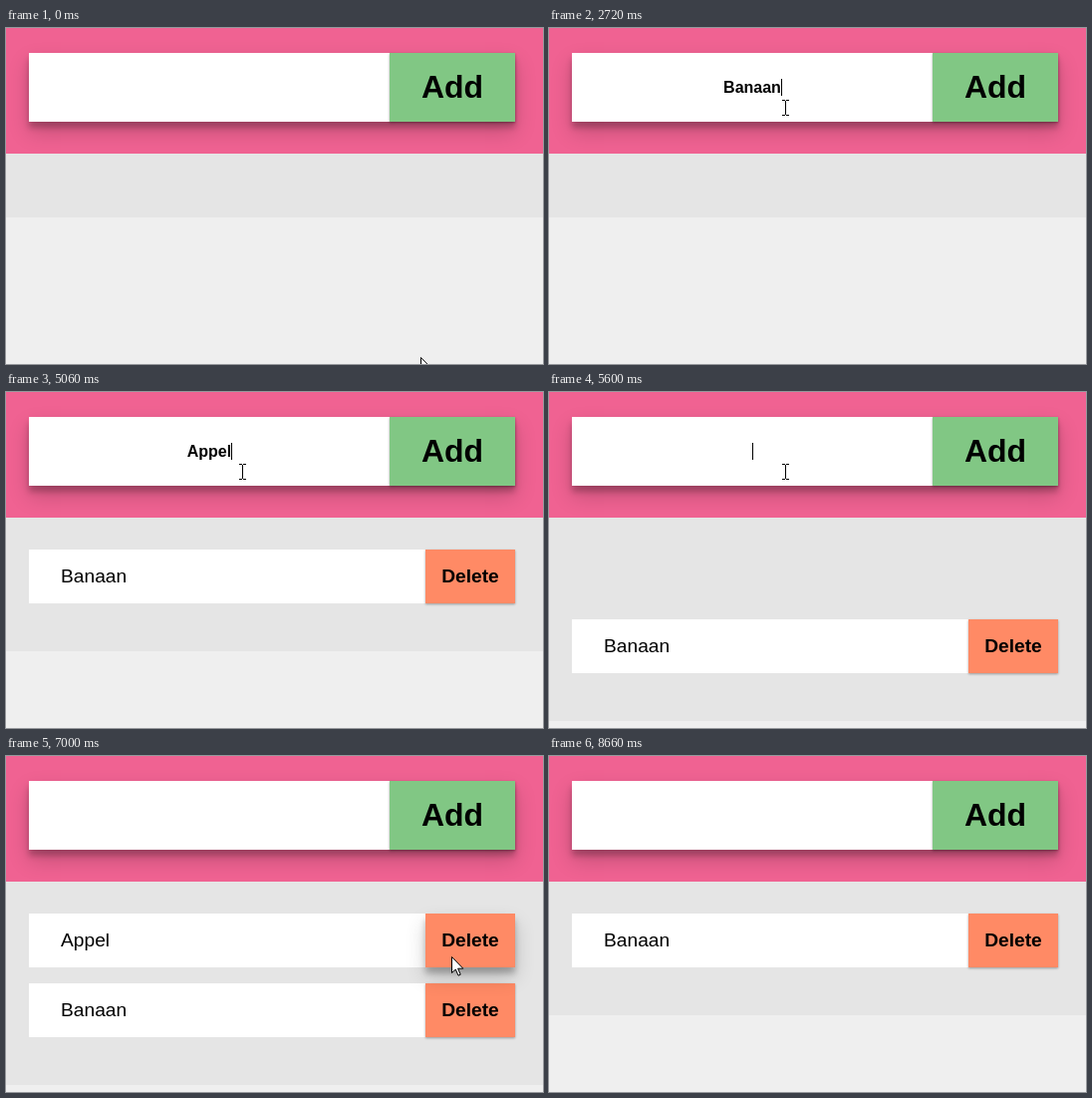
An HTML page for the animation above (8.89 s loop, 539 px wide and 337 px high).

```html
<!DOCTYPE html>
<html lang="nl">
<head>
<meta charset="utf-8">
<title>List</title>
<style>
  html, body { margin: 0; width: 100%; height: 100%; overflow: hidden; }
  body { background: #efefef; font-family: "Liberation Sans", Arial, sans-serif; color: #000; }
  div, #cursors svg { position: absolute; }
  #stage { width: 539px; height: 337px; overflow: hidden; }
  #header { width: 539px; height: 126px; background: #f06292; }
  #list { top: 126px; width: 539px; background: #e5e5e5; }
  #bar {
    left: 23px; top: 25px; width: 488px; height: 69px; background: #fff;
    box-shadow: 0 10px 20px rgba(0,0,0,.19), 0 6px 6px rgba(0,0,0,.23);
  }
  #field { width: 362px; top: 26px; font: bold 16px/17px "Liberation Sans", Arial, sans-serif; text-align: center; }
  #typed { display: inline-block; position: relative; height: 17px; vertical-align: top; }
  #caret { left: 100%; top: 0; width: 1px; height: 17px; background: #000; }
  .button { right: 0; top: 0; text-align: center; font-weight: bold; }
  #add {
    width: 126px; height: 69px; background: #81c784; font-size: 32px; line-height: 69px;
    box-shadow: 0 1px 3px rgba(0,0,0,.12), 0 1px 2px rgba(0,0,0,.24);
  }
  .item { left: 23px; width: 488px; height: 54px; background: #fff; font-size: 19.2px; line-height: 54px; }
  .item span { position: absolute; left: 32px; }
  .item .button { width: 90px; height: 54px; background: #ff8a65; }
  #cursors { z-index: 9; }
</style>
</head>
<body>
<div id="stage">
  <div id="header"></div>
  <div id="list"></div>
  <div id="bar">
    <div id="field"><span id="typed"><span id="word"></span><div id="caret"></div></span></div>
    <div id="add" class="button">Add</div>
  </div>
  <div class="item" id="banaan"><span>Banaan</span><div class="button">Delete</div></div>
  <div class="item" id="appel" style="z-index:1"><span>Appel</span><div class="button">Delete</div></div>
  <div id="cursors">
    <svg id="arrow" width="14" height="21">
      <path d="M.5 .5V16.5L4.3 13L7 19.2L9.2 18.2L6.6 12.2H11.8Z" fill="#fff" stroke="#000"/>
    </svg>
    <svg id="beam" width="7" height="16" style="left:-3px;top:-8px" shape-rendering="crispEdges">
      <path d="M0 .5H3M4 .5H7M3.5 1V15M0 15.5H3M4 15.5H7" fill="none" stroke="#000"/>
    </svg>
  </div>
</div>
<script>
const LOOP = 8890;
const ADD_BANAAN = 3250, ADD_APPEL = 5600, DELETE_APPEL = 7380;
const FADE = 400, REMOVED = DELETE_APPEL + FADE;
const FIRST_ROW = 158, ROW = 70;

const typing = [
  [0, ""], [1740, "B"], [2030, "Ba"], [2340, "Ban"], [2420, "Bana"], [2560, "Banaa"], [2720, "Banaan"],
  [ADD_BANAAN, ""], [4460, "A"], [4700, "Ap"], [4840, "App"], [4980, "Appe"], [5060, "Appel"], [ADD_APPEL, ""]
];
const caretOn = [[970, 1510], [1740, 3710], [4170, 6060], [6480, 7000], [7460, 7850], [8280, 8660]];
// Each move: start, end, from, to
const moves = [
  [30, 740, [416, 330], [237, 80]],
  [6100, 6720, [237, 80], [447, 201]],
  [7800, 8120, [447, 201], [455, 345]]
];

const $ = id => document.getElementById(id);
const clamp = x => Math.min(1, Math.max(0, x));
const lerp = (a, b, p) => a + (b - a) * p;
const smooth = p => p * p * (3 - 2 * p);

// The CSS "ease" curve: cubic-bezier(.25, .1, .25, 1)
function ease(x) {
  x = clamp(x);
  const bezier = (a, b, s) => 3 * a * s * (1 - s) ** 2 + 3 * b * s * s * (1 - s) + s ** 3;
  let low = 0, high = 1;
  for (let i = 0; i < 20; i++) {
    const mid = (low + high) / 2;
    if (bezier(.25, .25, mid) < x) low = mid; else high = mid;
  }
  return bezier(.1, 1, low);
}

function cursorAt(t) {
  let position = moves[0][2];
  for (const [start, end, from, to] of moves) {
    if (t < start) break;
    const p = smooth(clamp((t - start) / (end - start)));
    position = from.map((v, i) => Math.round(lerp(v, to[i], p)));
  }
  return position;
}

function shadow(p) {
  const layer = (y, blur, alpha) => `0 ${y}px ${blur}px rgba(0,0,0,${alpha})`;
  return layer(lerp(1, 10, p), lerp(3, 20, p), lerp(.12, .19, p)) + "," +
         layer(lerp(1, 6, p), lerp(2, 6, p), lerp(.24, .23, p));
}

function drawItem(id, visible, top, presence, hover) {
  const item = $(id);
  item.style.display = visible ? "block" : "none";
  item.style.top = top + "px";
  item.style.opacity = presence;
  item.style.transform = presence < 1 ? `translateY(${-20 * (1 - presence)}px)` : "none";
  item.lastElementChild.style.boxShadow = shadow(hover);
}

function render(t) {
  $("word").textContent = typing.filter(([start]) => t >= start).pop()[1];
  $("caret").hidden = !caretOn.some(([on, off]) => t >= on && t < off);

  const [x, y] = cursorAt(t);
  const overField = x >= 23 && x < 385 && y >= 25 && y < 94;
  $("cursors").style.transform = `translate(${x}px,${y}px)`;
  $("arrow").style.display = overField ? "none" : "block";
  $("beam").style.display = overField ? "block" : "none";

  const hasAppel = t >= ADD_APPEL && t < REMOVED;
  const count = (t >= ADD_BANAAN) + hasAppel;
  $("list").style.height = 64 + ROW * count + "px";

  const appelPresence = ease((t - ADD_APPEL) / FADE) * (1 - ease((t - DELETE_APPEL) / FADE));
  const hoverIn = ease((t - 6580) / 300);
  const hoverOut = t < REMOVED ? 0 : 1 - ease((t - REMOVED) / 100) * (1 - ease((t - 7880) / 240));
  drawItem("appel", hasAppel, FIRST_ROW, appelPresence, hoverIn);
  drawItem("banaan", t >= ADD_BANAAN, FIRST_ROW + (hasAppel ? ROW : 0),
    ease((t - ADD_BANAAN) / FADE), t < REMOVED ? 0 : 1 - hoverOut);
}

function frame() {
  render(performance.now() % LOOP);
  requestAnimationFrame(frame);
}
frame();
</script>
</body>
</html>
```
